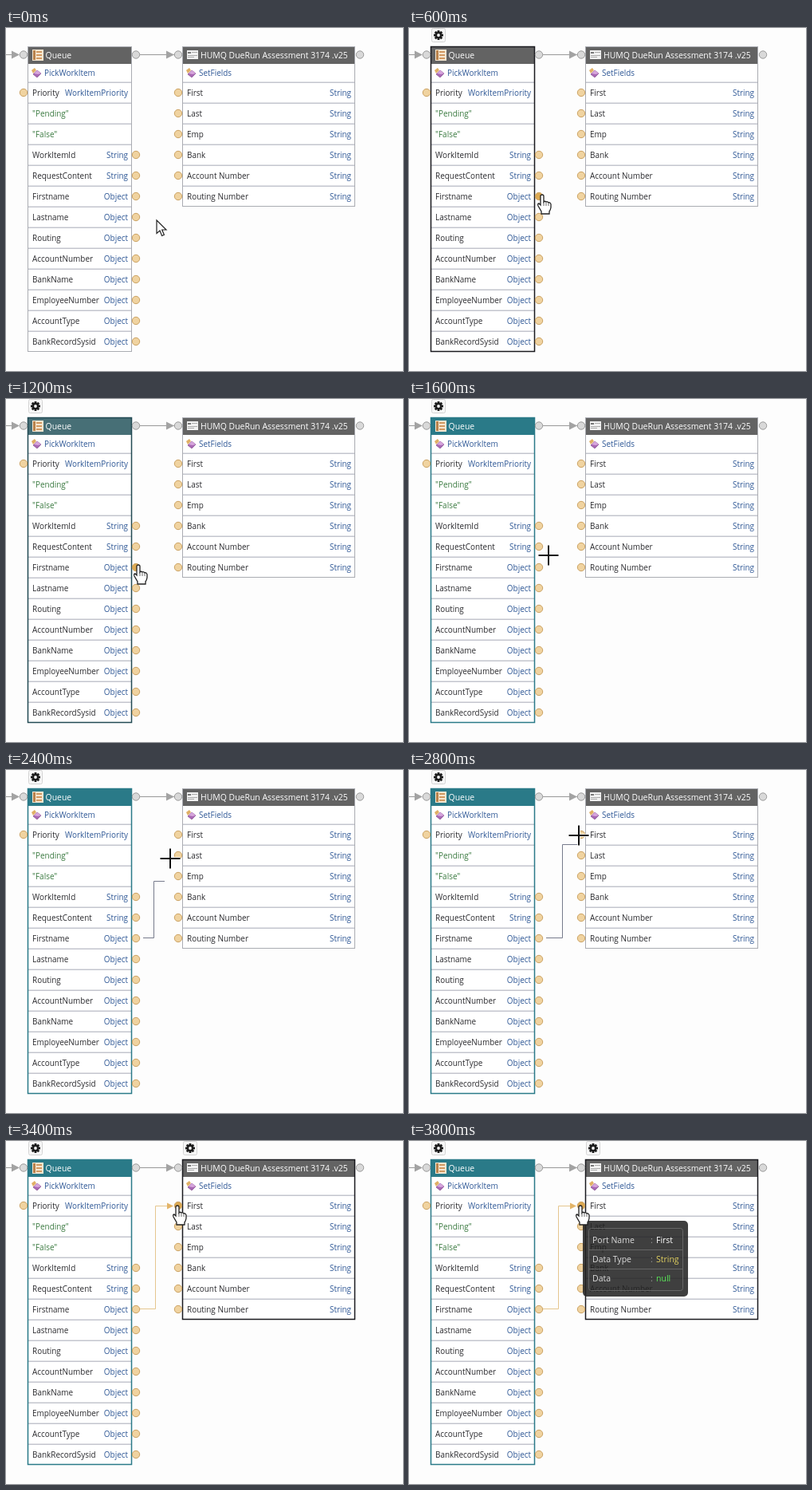
An HTML page with a canvas for the animation above (4200 ms loop, 498 by 430 pixels).

```html
<!DOCTYPE html>
<html lang="en">
<head>
<meta charset="utf-8">
<title>Connecting ports</title>
<style>
  html, body { margin: 0; width: 100%; height: 100%; overflow: hidden; background: #fdfdfd; }
  canvas { display: block; }
</style>
</head>
<body>
<canvas id="stage" width="498" height="430"></canvas>
<script>
const ctx = document.getElementById('stage').getContext('2d');
const LOOP = 4200, ROW = 26;
const INK = '#2a2a2e', BLUE = '#2f5896', GREEN = '#39793f', TEAL = [42, 122, 136], GRAY = [99, 99, 99];

const queue = {
  x: 27, w: 131, title: 'Queue', method: 'PickWorkItem',
  rows: [['Priority', 'WorkItemPriority'], ['"Pending"'], ['"False"'],
    ...['WorkItemId', 'RequestContent'].map(name => [name, 'String']),
    ...['Firstname', 'Lastname', 'Routing', 'AccountNumber', 'BankName',
      'EmployeeNumber', 'AccountType', 'BankRecordSysid'].map(name => [name, 'Object'])]
};
const fields = {
  x: 221, w: 217, title: 'HUMQ DueRun Assessment 3174 .v25', method: 'SetFields',
  rows: ['First', 'Last', 'Emp', 'Bank', 'Account Number', 'Routing Number'].map(name => [name, 'String'])
};

// Pointer by start time; a wire follows the cross with some lag.
const pointer = [
  { at: 0, kind: arrow, x: 189, y: 241 },
  { at: 200, kind: arrow, x: 175, y: 217 },
  { at: 400, kind: arrow, x: 172, y: 214 },
  { at: 600, kind: hand, x: 167, y: 209 },
  { at: 1000, kind: hand, x: 166, y: 208 },
  { at: 1600, kind: cross, x: 175, y: 196 },
  { at: 1800, kind: cross, x: 186, y: 176, wire: [179, 189] },
  { at: 2000, kind: cross, x: 199, y: 150, wire: [190, 168] },
  { at: 2200, kind: cross, x: 206, y: 111, wire: [199, 139] },
  { at: 2600, kind: cross, x: 213, y: 87, wire: [206, 102] },
  { at: 2800, kind: cross, x: 213, y: 82, wire: [212, 93] },
  { at: 3000, kind: cross, x: 219, y: 79, wire: [213, 82] },
  { at: 3200, kind: cross, x: 220, y: 79, wire: [214, 80] },
  { at: 3400, kind: hand, x: 215, y: 81 }
];

const rowY = i => 81 + i * ROW;
const rgb = c => `rgb(${c.map(Math.round)})`;
const mix = (a, b, k) => a.map((v, i) => v + (b[i] - v) * k);

function text(s, x, y, color, size = 9.95, align = 'left') {
  ctx.font = `${size}px "Open Sans", "Noto Sans", sans-serif`;
  ctx.textAlign = align;
  ctx.fillStyle = color;
  ctx.fillText(s, x, y + 3.6);
}

function rect(x, y, w, h, color) {
  ctx.fillStyle = color;
  ctx.fillRect(x, y, w, h);
}

function shape(path, fill, stroke, width = 1) {
  if (fill) { ctx.fillStyle = fill; ctx.fill(path); }
  if (stroke) { ctx.strokeStyle = stroke; ctx.lineWidth = width; ctx.stroke(path); }
}

function disc(x, y, r, fill, stroke) {
  const path = new Path2D();
  path.arc(x, y, r, 0, 2 * Math.PI);
  shape(path, fill, stroke);
}

const flowPort = x => disc(x, 33.5, 4.7, '#d9d9d9', '#999');
const dataPort = (x, y, hot) => disc(x, y, 4.7, hot ? '#dca952' : '#f0d3a0', '#cba160');

function line(points, color) {
  shape(new Path2D('M' + points.join('L')), null, color);
}

function arrowHead(x, y, length, half, color) {
  shape(new Path2D(`M${x} ${y}l${-length} ${-half}v${2 * half}z`), color);
}

function gear(x) {
  const button = new Path2D();
  button.roundRect(x - 8.5, .5, 17, 17, 2);
  shape(button, '#f7f7f7', '#d4d4d4');
  ctx.save();
  ctx.translate(x, 9);
  for (let i = 0; i < 8; i++) {
    rect(-1.4, -6, 2.8, 4, '#1c1c1c');
    ctx.rotate(Math.PI / 4);
  }
  ctx.restore();
  disc(x, 9, 4.4, '#1c1c1c');
  disc(x, 9, 1.9, '#f7f7f7');
}

function methodIcon(x) {
  shape(new Path2D(`M${x} 53l4 -3 2 3 -4 4z`), '#e0b066');
  shape(new Path2D(`M${x + 7} 53l5 4 -5 5 -5 -4z`), '#a868b4', '#84508f', .7);
  shape(new Path2D(`M${x + 7} 53l5 4 -4 1 -5 -1z`), '#d6a5dc');
}

function queueIcon() {
  rect(33, 27, 14, 14, '#f5e6d0');
  rect(34, 28, 3, 12, '#b9824c');
  for (let y = 29; y < 40; y += 4) rect(38, y, 7, 2, '#d39a62');
}

function formIcon() {
  rect(227, 28, 14, 11, '#f2f2f2');
  rect(228, 30, 4, 2, '#777');
  rect(233, 30, 7, 1, '#aaa');
  rect(228, 34, 12, 1, '#aaa');
  rect(228, 36, 8, 1, '#aaa');
}

function card({ x, w, title, method, rows }, header, border, width) {
  const bottom = 68 + rows.length * ROW - 1;
  rect(x, 23, w, bottom - 23, '#fff');
  rect(x, 23, w, 22, header);
  text(title, x + (x < 100 ? 22.5 : 23), 34, '#fff', 10.45);
  methodIcon(x + 5);
  text(method, x + 21, 56, BLUE);
  rows.forEach(([name, type], i) => {
    rect(x, 67.5 + i * ROW, w, 1.5, '#c3c5ce');
    text(name, x + 6, rowY(i), name[0] === '"' ? GREEN : INK);
    if (type) text(type, x + w - 5, rowY(i), BLUE, 9.95, 'right');
  });
  ctx.strokeStyle = border;
  ctx.lineWidth = width;
  ctx.strokeRect(x + .5, 23.5, w - 1, bottom - 23);
}

function arrow() {
  shape(new Path2D('M0 0V16.5L4 13 6.6 19.5 9.4 18.2 6.7 12H12z'), '#fff', '#222', 1.2);
}

function hand() {
  shape(new Path2D('M-2 2Q-2 0 0 0T2 2V9Q3 7.5 5 9 6.5 8 8 10 10 9 11 12V16Q10.5 19 9 21V24H-1V21L-5 14Q-6 11 -4 11L-2 13z'),
    '#fff', '#222', 1.3);
  shape(new Path2D('M2 9V14M5 9.5V14M8 10.5V14'), null, '#444', .8);
}

function cross() {
  const path = new Path2D('M-12.5 0H12.5M0 -12.5V12.5');
  shape(path, null, '#fff', 3.6);
  shape(path, null, '#111', 2);
}

function tooltip() {
  const panel = new Path2D(), frame = new Path2D('M226 136.5H343M226 160.5H343');
  panel.roundRect(218, 100, 132, 95, 5);
  shape(panel, 'rgba(35,35,35,.87)');
  frame.roundRect(225.5, 109.5, 118, 78, 3);
  shape(frame, null, '#666');
  [['Port Name', 'First', '#fff'], ['Data Type', 'String', '#e2d160'], ['Data', 'null', '#5cf05a']]
    .forEach(([label, value, color], i) => {
      const y = 124 + i * 24;
      text(label, 230, y, '#dcdcdc', 10.5);
      text(':', 303, y, '#999', 10.5);
      text(value, 310, y, color, 10.5);
    });
}

function draw(t) {
  const now = pointer.findLast(p => p.at <= t);
  const hovered = t >= 600, linked = t >= 3400;
  const teal = t < 1200 ? 0 : t < 1400 ? .5 : 1;

  rect(0, 0, 498, 430, '#fdfdfd');
  line([[0, 33.5], [10, 33.5]], '#999');
  line([[168, 33.5], [212, 33.5]], '#999');
  arrowHead(17, 33.5, 10, 5, '#a3a3a3');
  arrowHead(211, 33.5, 10, 5, '#a3a3a3');

  const border = hovered ? rgb(mix([25, 25, 30], TEAL, teal)) : '#aaacb2';
  card(queue, rgb(mix(GRAY, TEAL, teal)), border, hovered ? 1.5 : 1);
  card(fields, rgb(GRAY), linked ? '#19191e' : '#aaacb2', linked ? 1.5 : 1);
  queueIcon();
  formIcon();
  [22, 163, 216, 444].forEach(flowPort);

  dataPort(22, rowY(0));
  for (let i = 3; i < queue.rows.length; i++) dataPort(163, rowY(i), i === 5 && hovered && t < 1600);
  fields.rows.forEach((_, i) => dataPort(216, rowY(i), i === 0 && linked));

  if (now.wire) {
    const [x, y] = now.wire, middle = Math.floor((172 + x) / 2) + .5;
    line([[172, 210.5], [middle, 210.5], [middle, y + .5], [x, y + .5]], '#777b8c');
  }
  if (linked) {
    line([[168, 210.5], [187.5, 210.5], [187.5, 81.5], [203, 81.5]], '#e5c68e');
    arrowHead(210, 81.5, 8, 4, '#e3b468');
  }
  if (hovered) gear(37);
  if (linked) gear(231);
  if (t >= 3800) tooltip();

  ctx.save();
  ctx.translate(now.x, now.y);
  now.kind();
  ctx.restore();
}

function tick() {
  draw(performance.now() % LOOP);
  requestAnimationFrame(tick);
}
tick();
</script>
</body>
</html>
```
